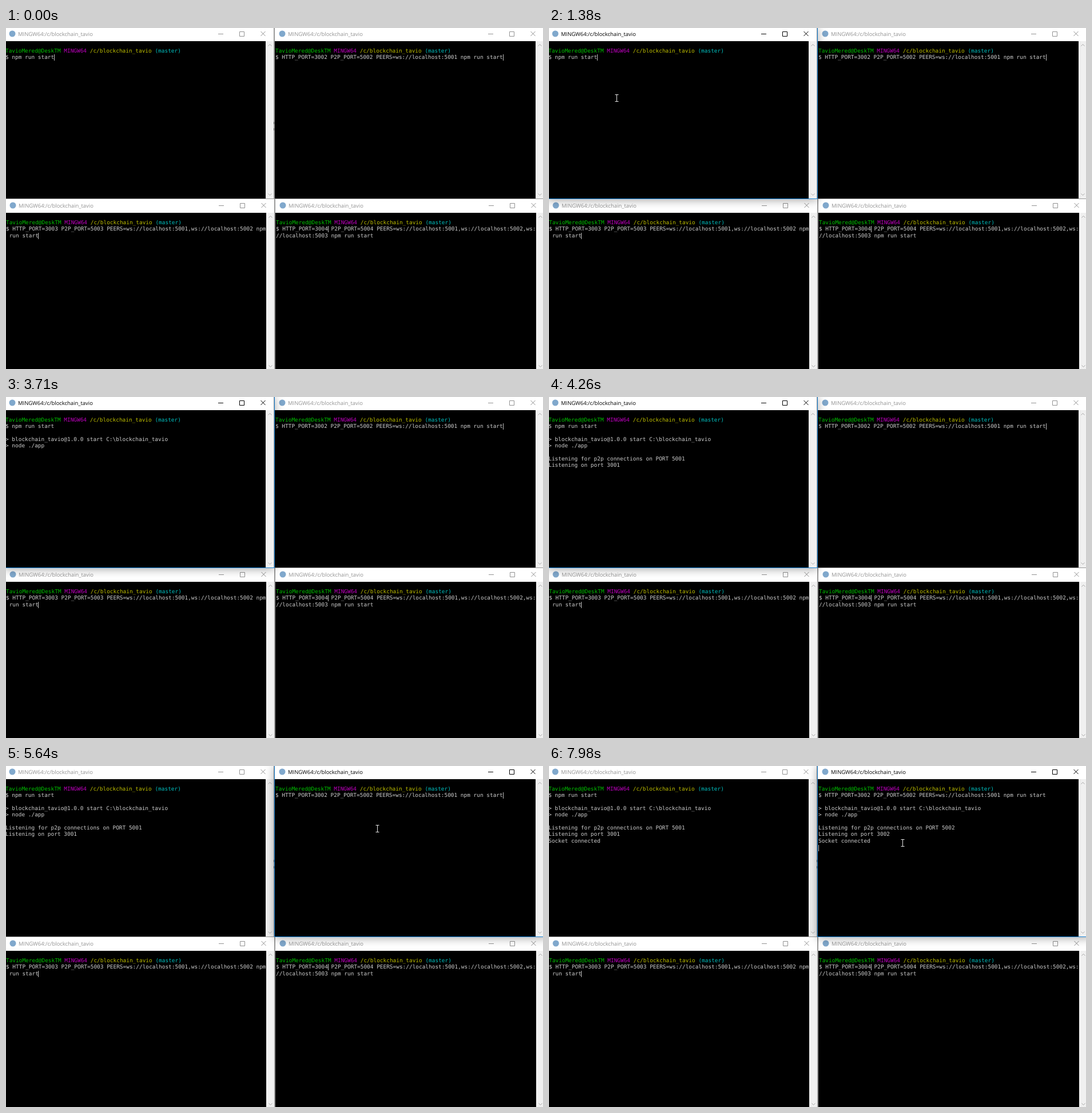
Write an HTML page that moves like this. It is 939 px wide and 596 px high and loops after 8000 ms.

```html
<!DOCTYPE html>
<html lang="en">
<head>
<meta charset="utf-8">
<title>Terminals</title>
<style>
html, body { margin: 0; width: 100%; height: 100%; overflow: hidden; background: #999; }
#stage { position: relative; width: 939px; height: 596px; overflow: hidden; }
svg { position: absolute; left: 0; top: 0; }
text { font: 9.45px "DejaVu Sans Mono", monospace; fill: #ccc; white-space: pre; text-rendering: geometricPrecision; }
.title { font: 9.43px "Open Sans", sans-serif; fill: currentColor; }
.user { fill: #00bf00; } .sys { fill: #bf00bf; } .path { fill: #bfbf00; } .branch { fill: #00bfbf; }
.caret { fill: #bfbfbf; }
.win { color: #929292; }
.focus { position: absolute; top: -2px; height: 301px; box-sizing: border-box;
  border: 1px solid #1883d7; box-shadow: 0 2px 15px rgba(0, 0, 0, .35); }
#focus1 { left: -3px; width: 473px; }
#focus2 { left: 469px; width: 480px; }

/* percentages are ms / 80 */
.anim { animation: 8s step-end infinite; }
#win1 { animation-name: active1; }
#win2 { animation-name: active2; }
#focus1 { animation-name: focus1; }
#focus2 { animation-name: focus2; }
#gap { animation-name: gap; }
#caret1 { animation-name: caret1; }
#caret2 { animation-name: caret2, blink2; }
#run1 { animation-name: run1; }
#listen1 { animation-name: listen1; }
#run2 { animation-name: run2; }
#listen2 { animation-name: listen2; }
.socket { animation-name: socket; }
#mouse { animation-name: move, seen; }

@keyframes active1 { 0% { color: #929292 } 17.25% { color: #000 } 68.625%, 100% { color: #929292 } }
@keyframes active2 { 0% { color: #929292 } 68.625%, 100% { color: #000 } }
@keyframes focus1 { 0% { opacity: 0 } 17.25% { opacity: 1 } 68.625%, 100% { opacity: 0 } }
@keyframes focus2 { 0% { opacity: 0 } 68.625%, 100% { opacity: 1 } }
@keyframes gap { 0% { opacity: 1 } 17.25% { opacity: 0 } 68.625%, 100% { opacity: 1 } }
@keyframes caret1 { 0% { opacity: 1 } 23.125%, 100% { opacity: 0 } }
@keyframes run1 { 0% { opacity: 0 } 46.375%, 100% { opacity: 1 } }
@keyframes listen1 { 0% { opacity: 0 } 53.25%, 100% { opacity: 1 } }
@keyframes run2 { 0% { opacity: 0 } 92.375%, 100% { opacity: 1 } }
@keyframes listen2 { 0% { opacity: 0 } 95.875%, 100% { opacity: 1 } }
@keyframes socket { 0% { opacity: 0 } 96.875%, 100% { opacity: 1 } }
@keyframes caret2 {
  0% { transform: translate(397px, 46px) }
  72.625% { transform: translate(-1px, 58px) }
  92.375% { transform: translate(-1px, 104px) }
  95.875% { transform: translate(-1px, 126px) }
  96.875%, 100% { transform: translate(-1px, 138px) }
}
@keyframes blink2 {
  0% { opacity: 1 } 72.625% { opacity: 0 } 74.5% { opacity: 1 }
  81.375% { opacity: 0 } 88.25%, 100% { opacity: 1 }
}
@keyframes move {
  0% { transform: translate(815px, 590px) }
  3.625% { transform: translate(815px, 590px); animation-timing-function: steps(3) }
  6.5125% { transform: translate(640px, 470px); animation-timing-function: steps(4) }
  10.3625% { transform: translate(250px, 215px); animation-timing-function: steps(3) }
  13.25% { transform: translate(125px, 130px) }
  14.25% { transform: translate(121px, 126px) }
  15.125% { transform: translate(118px, 123px) }
  23.125% { transform: translate(118px, 125px) }
  26% { transform: translate(119px, 125px) }
  59% { transform: translate(121px, 125px); animation-timing-function: steps(3) }
  61.9% { transform: translate(240px, 122px); animation-timing-function: steps(3) }
  64.8% { transform: translate(500px, 113px); animation-timing-function: steps(3) }
  67.7% { transform: translate(650px, 109px) }
  70.5% { transform: translate(649px, 110px) }
  96.875% { transform: translate(645px, 113px); animation-timing-function: steps(3) }
  99.7%, 100% { transform: translate(618px, 135px) }
}
@keyframes seen {
  0% { opacity: 0 } 3.625% { opacity: 1 } 27.875% { opacity: 0 } 59% { opacity: 1 }
  73.625% { opacity: 0 } 96.875%, 100% { opacity: 1 }
}
</style>
</head>
<body>
<div id="stage">
<svg width="939" height="596">
  <defs>
    <g id="frame">
      <path fill="#fff" d="M-2-1H468V23H-2z"/>
      <path d="M-2 23H454V298H-2z"/>
      <path fill="#f0f0f0" d="M454 23H468V298H454z"/>
      <circle cx="11" cy="10" r="5.5" fill="#80a8cc"/>
      <text class="title" x="21" y="13.5">MINGW64:/c/blockchain_tavio</text>
      <path fill="none" stroke="currentColor" d="M371 10.5H380M408.5 6.5H416.5V14.5H408.5zM445.5 6 453.5 14M453.5 6 445.5 14"/>
      <path fill="none" stroke="#a6a6a6" d="M458.5 31.5 461.5 28.5 464.5 31.5M458.5 289.5 461.5 292.5 464.5 289.5"/>
    </g>
    <text id="prompt" x="-1" y="42.8"><tspan class="user">TavioMered@DeskTM</tspan> <tspan class="sys">MINGW64</tspan> <tspan class="path">/c/blockchain_tavio</tspan> <tspan class="branch">(master)</tspan></text>
    <g id="launch">
      <text x="-1" y="76.9">&gt; blockchain_tavio@1.0.0 start C:\blockchain_tavio</text>
      <text x="-1" y="88.3">&gt; node ./app</text>
    </g>
    <text id="connected" x="-1" y="133.8">Socket connected</text>
    <rect id="bar" width="1" height="11"/>
  </defs>

  <g transform="translate(1 300)" class="win">
    <use href="#frame"/>
    <use href="#prompt"/>
    <text x="-1" y="54.2">$ HTTP_PORT=3003 P2P_PORT=5003 PEERS=ws://localhost:5001,ws://localhost:5002 npm</text>
    <text x="-1" y="65.6"> run start</text>
    <use href="#bar" class="caret" x="55" y="58"/>
  </g>

  <g transform="translate(473 300)" class="win">
    <use href="#frame"/>
    <use href="#prompt"/>
    <text x="-1" y="54.2">$ HTTP_PORT=3004 P2P_PORT=5004 PEERS=ws://localhost:5001,ws://localhost:5002,ws:</text>
    <text x="-1" y="65.6">//localhost:5003 npm run start</text>
    <use href="#bar" class="caret" x="90" y="46"/>
  </g>

  <g id="win1" class="win anim">
    <use href="#frame"/>
    <use href="#prompt"/>
    <text x="-1" y="54.2">$ npm run start</text>
    <g id="caret1" class="anim"><use href="#bar" class="caret" x="84" y="46"/></g>
    <g id="run1" class="anim"><use href="#launch"/></g>
    <g id="listen1" class="anim">
      <text x="-1" y="111.1">Listening for p2p connections on PORT 5001</text>
      <text x="-1" y="122.4">Listening on port 3001</text>
    </g>
    <g class="socket anim"><use href="#connected"/></g>
  </g>

  <g transform="translate(472 0)">
    <g id="win2" class="win anim">
      <use href="#frame"/>
      <use href="#prompt"/>
      <text x="-1" y="54.2">$ HTTP_PORT=3002 P2P_PORT=5002 PEERS=ws://localhost:5001 npm run start</text>
      <g id="caret2" class="anim"><use href="#bar" class="caret"/></g>
      <g id="run2" class="anim"><use href="#launch"/></g>
      <g id="listen2" class="anim">
        <text x="-1" y="111.1">Listening for p2p connections on PORT 5002</text>
        <text x="-1" y="122.4">Listening on port 3002</text>
      </g>
      <g class="socket anim"><use href="#connected"/></g>
    </g>
  </g>
  <path id="gap" class="anim" fill="#444" d="M468 164h1v4h-1zM468 175h1v4h-1z"/>
</svg>
<div id="focus1" class="focus anim"></div>
<div id="focus2" class="focus anim"></div>
<svg width="939" height="596">
  <path id="mouse" class="anim" fill="none" stroke="#e4e4e4" d="M-2.5-6.5H3.5M-2.5 5.5H3.5M.5-6V5"/>
</svg>
</div>
</body>
</html>
```
